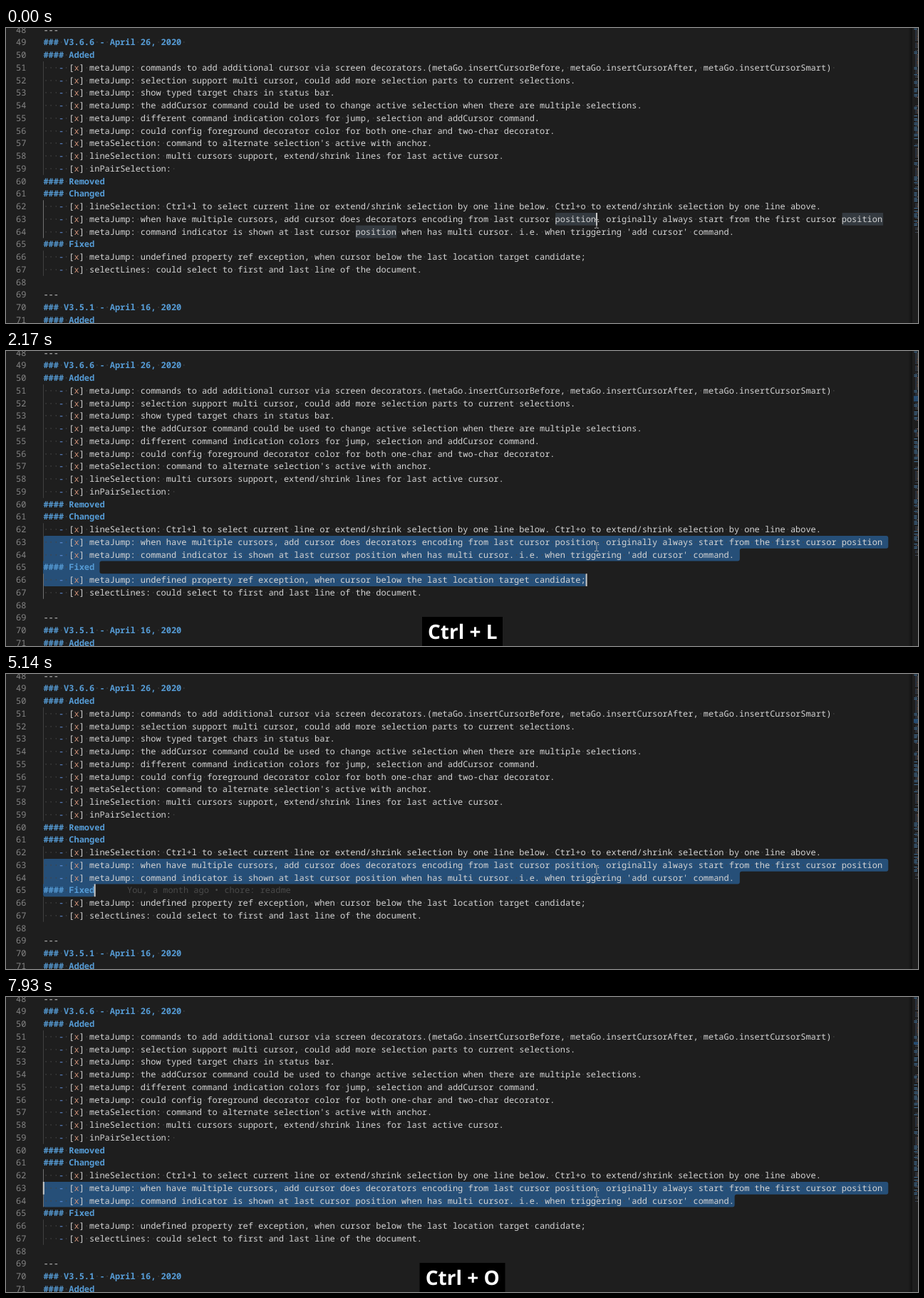
These frames come from a looping animation (1280x415 px, 8 s). An HTML page:

```html
<!DOCTYPE html>
<html lang="en">
<head>
<meta charset="utf-8">
<title>Line selection</title>
<style>
  html, body { margin: 0; width: 100%; height: 100%; overflow: hidden; background: #1e1e1e; }
  svg { display: block; width: 1280px; height: 415px; }
  text { white-space: pre; text-rendering: geometricPrecision; }
  .code { font: 11.978px "Noto Sans Mono", "DejaVu Sans Mono", monospace; fill: #d4d4d4; }
  .code .num { fill: #858585; }
  .code .dots { fill: #454545; }
  .code .head { fill: #569cd6; font-weight: bold; }
  .code .bullet { fill: #6796e6; }
  .code .check { fill: #ce9178; }
  .code .note { fill: #4a4a4a; }
  .keys { font: bold 28px "Open Sans", "Noto Sans", sans-serif; fill: #fff; text-anchor: middle; }
</style>
</head>
<body>
<svg id="stage" viewBox="0 0 1280 415">
  <defs>
    <linearGradient id="shade">
      <stop offset="0" stop-color="#000" stop-opacity="0"/>
      <stop offset="1" stop-color="#000" stop-opacity=".4"/>
    </linearGradient>
  </defs>
</svg>
<script>
const LOOP = 8000, FIRST = 48, X0 = 52.4, ADV = 7.187, ROW = 17.75;

const LINES = [
  "---",
  "### V3.6.6 - April 26, 2020 ",
  "#### Added",
  "   - [x] metaJump: commands to add additional cursor via screen decorators.(metaGo.insertCursorBefore, metaGo.insertCursorAfter, metaGo.insertCursorSmart) ",
  "   - [x] metaJump: selection support multi cursor, could add more selection parts to current selections.",
  "   - [x] metaJump: show typed target chars in status bar.",
  "   - [x] metaJump: the addCursor command could be used to change active selection when there are multiple selections.",
  "   - [x] metaJump: different command indication colors for jump, selection and addCursor command.",
  "   - [x] metaJump: could config foreground decorator color for both one-char and two-char decorator.",
  "   - [x] metaSelection: command to alternate selection's active with anchor.",
  "   - [x] lineSelection: multi cursors support, extend/shrink lines for last active cursor.",
  "   - [x] inPairSelection: ",
  "#### Removed",
  "#### Changed",
  "   - [x] lineSelection: Ctrl+l to select current line or extend/shrink selection by one line below. Ctrl+o to extend/shrink selection by one line above.",
  "   - [x] metaJump: when have multiple cursors, add cursor does decorators encoding from last cursor position. originally always start from the first cursor position",
  "   - [x] metaJump: command indicator is shown at last cursor position when has multi cursor. i.e. when triggering 'add cursor' command.",
  "#### Fixed",
  "   - [x] metaJump: undefined property ref exception, when cursor below the last location target candidate;",
  "   - [x] selectLines: could select to first and last line of the document.",
  "",
  "---",
  "### V3.5.1 - April 16, 2020",
  "#### Added"
];

const NOTES = {
  64: "You, 2 hours ago • chore",
  65: "You, a month ago • chore: readme",
  66: "You, 2 hours ago • fix: undefined property ref exception",
  67: "You, 2 hours ago • changelog"
};

const BOX_WIDTH = { "Ctrl + L": 113, "Ctrl + O": 120, "Alt + A": 111 };

const colX = col => X0 + col * ADV;
const rowY = line => 260 + (line - 63) * ROW;
const baseY = line => rowY(line) + 12.8;
const textOf = line => LINES[line - FIRST];
const endX = line => colX(textOf(line).length);
const hard = s => s.replace(/ /g, "\u00a0");

const stage = document.getElementById("stage");

function el(parent, tag, attrs = {}, content) {
  const node = document.createElementNS("http://www.w3.org/2000/svg", tag);
  set(node, attrs);
  if (content !== undefined) node.textContent = content;
  return parent.appendChild(node);
}
function set(node, attrs) {
  for (const k in attrs) node.setAttribute(k, attrs[k]);
}
const show = (node, on) => set(node, { visibility: on ? "visible" : "hidden" });

// Layers, back to front
el(stage, "rect", { width: 1280, height: 415, fill: "#1e1e1e" });
const marks = el(stage, "g", { fill: "#343a40" });
for (const [line, col] of [[63, 100], [63, 156], [64, 61]])
  el(marks, "rect", { x: colX(col), y: rowY(line), width: 8 * ADV, height: ROW });
const selection = el(stage, "path", { fill: "#264f78" });
const guides = [[51, 59], [62, 64], [66, 67]].map(([from, to]) => ({
  from, to,
  node: el(stage, "rect", { x: 52, y: rowY(from), width: 1, height: (to - from + 1) * ROW })
}));

const code = el(stage, "g", { class: "code" });
LINES.forEach((text, i) => {
  const line = FIRST + i, y = baseY(line);
  el(code, "text", { x: 14, y, class: "num" }, line);
  const dots = text.replace(/[^ ]/g, "\u00a0").replace(/ /g, "·");
  if (dots.includes("·")) el(code, "text", { x: X0, y, class: "dots" }, dots);
  const node = el(code, "text", { x: X0, y });
  const part = (s, cls) => el(node, "tspan", cls ? { class: cls } : {}, hard(s));
  if (text.startsWith("#")) {
    part(text, "head");
  } else if (text.startsWith("   -")) {
    part("   -", "bullet");
    part(" [");
    part("x", "check");
    part(text.slice(7));
  } else {
    part(text);
  }
});
const note = el(code, "text", { class: "note" });

const caret = el(stage, "rect", { width: 2, height: ROW, fill: "#c8c9c7" });
el(stage, "path", {
  d: "M826 269.5h2.4m1 0h2.4M826 281.5h2.4m1 0h2.4M828.9 270v11",
  stroke: "#b4b4b4", fill: "none"
});

drawMinimap();
const mapSelection = el(stage, "rect", { x: 1274, y: 63, width: 6, fill: "#264f78", "fill-opacity": .85 });

const keys = el(stage, "g");
const keyBox = el(keys, "rect", { y: 374, height: 41, fill: "#000" });
const keyText = el(keys, "text", { x: 640.8, y: 405, class: "keys" });

function drawMinimap() {
  el(stage, "rect", { x: 1266, width: 6, height: 415, fill: "url(#shade)" });
  const map = el(stage, "g", { "fill-opacity": .6 });
  let seed = 7;
  const random = () => (seed = seed * 16807 % 2147483647) / 2147483647;
  for (let row = 0; row < 145; row++) {
    const text = textOf(row + 32);
    const r = random();
    const head = text === undefined ? r < .3 : text.startsWith("#");
    const blank = text === undefined ? r > .85 : !text;
    if (blank) continue;
    const y = row * 2 - 1;
    if (head) {
      el(map, "rect", { x: 1274.5, y, width: 4 + random() * 1.5, height: 1.2, fill: "#569cd6" });
    } else {
      el(map, "rect", { x: 1276.5, y, width: 1, height: 1, fill: "#6796e6" });
      el(map, "rect", { x: 1278.5, y, width: 1.5, height: 1, fill: random() < .3 ? "#ce9178" : "#8a8a8a" });
    }
  }
}

// Closed polygon with every corner rounded, inner ones too
function roundedPath(points, r) {
  const toward = (a, b) => {
    const d = Math.hypot(b[0] - a[0], b[1] - a[1]), k = Math.min(r, d / 2) / d;
    return [a[0] + (b[0] - a[0]) * k, a[1] + (b[1] - a[1]) * k];
  };
  const n = points.length;
  return points.map((p, i) => {
    const from = toward(p, points[(i + n - 1) % n]), to = toward(p, points[(i + 1) % n]);
    return `${i ? "L" : "M"}${from}Q${p} ${to}`;
  }).join("") + "Z";
}

function selectionPath(last) {
  const left = 52, points = [[left, rowY(63)]];
  for (let line = 63; line <= last; line++) {
    const right = endX(line) + (line < last ? ADV : 0);
    points.push([right, rowY(line)], [right, rowY(line + 1)]);
  }
  points.push([left, rowY(last + 1)]);
  return roundedPath(points, 3);
}

// Timeline: each step overrides part of the state
const ON = { blink: true }, OFF = { blink: false }, NOTE = { note: true };
const press = label => ({ label, alpha: 1 });
const fade = alpha => ({ alpha });
const selectTo = last => ({ last, line: last, col: textOf(last).length, blink: true, note: false });

const START = { line: 63, col: 108, blink: true, last: 0, note: false, label: "Ctrl + L", alpha: 0 };
const STEPS = [
  [170, OFF],
  [630, ON, press("Ctrl + L")],
  [720, selectTo(63)],
  [1180, OFF],
  [1560, selectTo(64)],
  [1790, NOTE],
  [1870, selectTo(65)],
  [2100, NOTE],
  [2170, selectTo(66)],
  [2420, NOTE],
  [2650, OFF],
  [3030, selectTo(67)],
  [3270, NOTE],
  [3500, OFF],
  [3730, selectTo(66), press("Ctrl + O")],
  [3960, NOTE],
  [4130, selectTo(65)],
  [4360, NOTE],
  [4590, OFF],
  [5060, ON, fade(.5)],
  [5140, fade(0)],
  [5440, press("Ctrl + O")],
  [5520, selectTo(64)],
  [5750, NOTE],
  [5980, OFF],
  [6380, fade(.5)],
  [6450, ON, fade(0)],
  [6850, { line: 63, col: 0, blink: true, note: false }, press("Alt + A")],
  [7310, OFF],
  [7780, ON, fade(.5)],
  [7860, fade(0)],
  [7930, press("Ctrl + O")]
];

function stateAt(t) {
  const state = { ...START };
  for (const [time, ...changes] of STEPS) {
    if (time > t) break;
    Object.assign(state, ...changes);
  }
  return state;
}

function render(t) {
  const s = stateAt(t);

  show(marks, !s.last);
  set(selection, { d: s.last ? selectionPath(s.last) : "" });
  set(mapSelection, { height: s.last ? (s.last - 62) * 2 : 0 });

  for (const g of guides)
    set(g.node, { fill: s.line >= g.from && s.line <= g.to ? "#707070" : "#404040" });

  set(caret, { x: colX(s.col) - .6, y: rowY(s.line) });
  show(caret, s.blink);

  show(note, s.note);
  if (s.note) {
    set(note, { x: endX(s.line) + 45.7, y: baseY(s.line) });
    note.textContent = hard(NOTES[s.line]);
  }

  const width = BOX_WIDTH[s.label];
  set(keys, { opacity: s.alpha });
  set(keyBox, { x: 640.5 - width / 2, width });
  keyText.textContent = s.label;
}

let begin;
function tick(now) {
  begin ??= now;
  render((now - begin) % LOOP);
  requestAnimationFrame(tick);
}
render(0);
requestAnimationFrame(tick);
</script>
</body>
</html>
```
